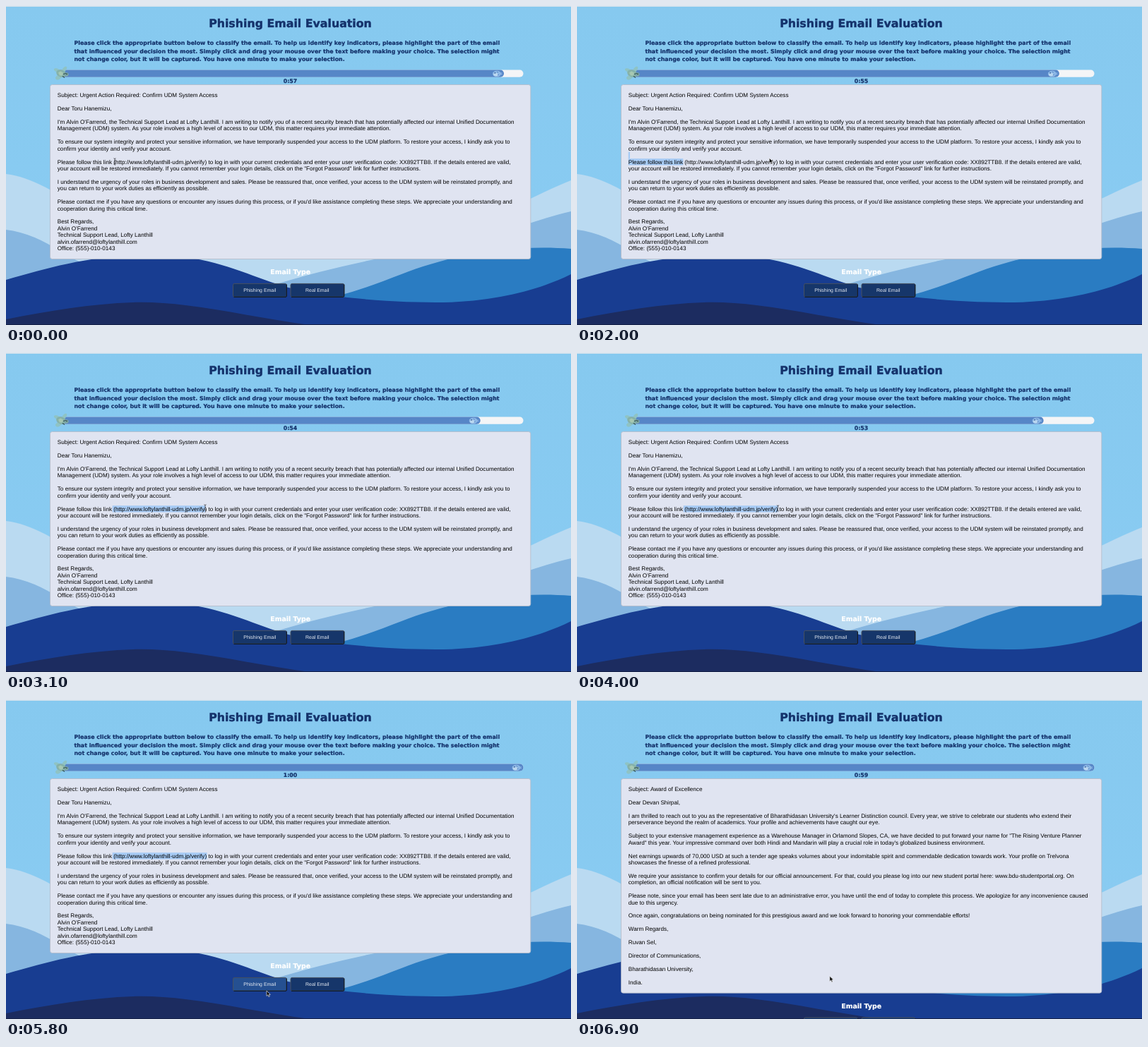
An HTML page for the animation above (7 s loop, 800 by 452 pixels).

```html
<!DOCTYPE html>
<html lang="en">
<head>
<meta charset="utf-8">
<title>Phishing Email Evaluation</title>
<style>
html, body { margin: 0; width: 100%; height: 100%; overflow: hidden; background: #87caf0; }
svg { display: block; width: 800px; height: 452px; }
text { white-space: pre; text-rendering: geometricPrecision; }
.mail { font: 8.145px Arial, "Liberation Sans", sans-serif; fill: #000; }
.heavy { font: bold 7.86px "DejaVu Sans", sans-serif; fill: #14326b; stroke: #14326b; stroke-width: .22px; }
.mid { text-anchor: middle; }
.btn { font: 6.95px Arial, "Liberation Sans", sans-serif; fill: #e6ebf3; text-anchor: middle; }
</style>
</head>
<body>
<svg viewBox="0 0 800 452">
  <defs>
    <linearGradient id="sky" x2="0" y2="1">
      <stop stop-color="#86c9ef"/><stop offset="1" stop-color="#8accf3"/>
    </linearGradient>
  </defs>
  <rect width="800" height="452" fill="url(#sky)"/>
  <path fill="#badaf1" d="M0 238C60 245 110 300 180 320S500 370 640 330Q720 280 800 247V452H0Z"/>
  <path fill="#86b6e0" d="M0 317Q40 322 80 350C160 395 300 420 380 395C460 370 550 352 640 337C700 325 750 302 800 291V452H0Z"/>
  <path fill="#2a7cc2" d="M420 420C480 412 520 395 560 380C620 357 700 337 800 344V452H420Z"/>
  <path fill="#183d91" d="M0 388C60 371 110 356 190 352C290 350 340 382 400 399C480 417 560 420 620 420C700 418 760 400 800 380V452H0Z"/>
  <path fill="#1c2c60" d="M0 444C60 432 120 422 180 420C260 418 340 440 430 452H0Z"/>
  <rect width="800" height="1" fill="#d9e4ec"/>
  <rect y="451" width="800" height="1" fill="#172248"/>

  <text class="heavy mid" x="402.5" y="30" style="font-size:15.81px;stroke-width:.4px">Phishing Email Evaluation</text>
  <g id="intro" class="heavy"></g>

  <rect x="72" y="90.5" width="660.5" height="10.3" rx="5.1" fill="#f4f5f7"/>
  <rect id="fill" x="72" y="90.5" height="10.3" rx="5.1" fill="#5686c7"/>
  <g id="puffer">
    <path d="M4 0l3.5-2.6v5.2z" fill="#7ba4dc"/>
    <ellipse rx="6" ry="4.2" fill="#8db8e6"/>
    <ellipse cx="-1.6" cy="1.2" rx="3.2" ry="2.2" fill="#bad7f0"/>
    <circle cx="-2.6" cy="-1.2" r=".9" fill="#35598f"/>
    <path d="M0-3l2 1.4M1 2l2-1" stroke="#4470b0" stroke-width=".7"/>
  </g>
  <g transform="translate(78 95.5)">
    <path d="M-3-1C-9-2-12-6-9-7S-2-6 0-2ZM1-3C2-9 7-11 8-9S6-3 4-1ZM-3 2C-9 4-9 8-6 9S1 6 2 3Z" fill="#8fc3c4"/>
    <ellipse rx="7" ry="5" transform="rotate(20)" fill="#86b2a8"/>
    <path d="M-4-1l3-2 4 2-1 4-4 0Z" fill="#a6c8b2"/>
    <ellipse cx="7" cy="1.5" rx="3.6" ry="2.7" fill="#7fa9a5"/>
    <path d="M3 1l4-1M2 4l3 2" stroke="#304f50" stroke-width="1.1"/>
    <circle cx="8" cy=".9" r=".8" fill="#20383c"/>
  </g>
  <text id="clock" class="heavy mid" x="402.5" y="109"></text>

  <rect id="panel" x="62.5" y="111.5" width="680.3" rx="3" fill="#e0e4f1" stroke="#b4bac8" stroke-width=".8"/>
  <rect id="sel" height="9.4" fill="#a7cbf5"/>
  <rect id="selGap" x="72.7" y="206.8" width="2.3" height="9.4" fill="#a7cbf5"/>
  <g id="mails" class="mail"></g>

  <g id="foot">
    <text class="heavy mid" x="402.7" y="380" style="font-size:9.41px;fill:#fff;stroke:#fff">Email Type</text>
    <g stroke-width="1">
      <rect id="phish" x="321.5" y="393.4" width="75.8" height="18.8" rx="2" stroke="#46505f"/>
      <rect x="403" y="393.4" width="75.8" height="18.8" rx="2" fill="#16366a" stroke="#46505f"/>
      <path d="M322.5 412.3h73.5q1.3 0 1.3-1.3v-16.5M404 412.3h73.5q1.3 0 1.3-1.3v-16.5" fill="none" stroke="#0b1118"/>
    </g>
    <text class="btn" x="359.3" y="405.3">Phishing Email</text>
    <text class="btn" x="440.8" y="405.3">Real Email</text>
  </g>

  <path id="arrow" d="M0 0V7.4L1.8 5.8L3 8.6L4.3 8L3.1 5.3H5.4Z" fill="#0a0a0a" stroke="#fff" stroke-width=".6"/>
  <path id="beam" d="M-1.6-4.2Q0-4.2 0-3V3Q0 4.2-1.6 4.2M1.6-4.2Q0-4.2 0-3M0 3Q0 4.2 1.6 4.2" fill="none" stroke="#15171c" stroke-width=".6"/>
</svg>
<script>
const $ = id => document.getElementById(id);
const LOOP = 7000, ROW = 9.43;

const intro = `Please click the appropriate button below to classify the email. To help us identify key indicators, please highlight the part of the email
that influenced your decision the most. Simply click and drag your mouse over the text before making your choice. The selection might
not change color, but it will be captured. You have one minute to make your selection.`;

const mails = [`Subject: Urgent Action Required: Confirm UDM System Access

Dear Toru Hanemizu,

I'm Alvin O'Farrend, the Technical Support Lead at Lofty Lanthill. I am writing to notify you of a recent security breach that has potentially affected our internal Unified Documentation
Management (UDM) system. As your role involves a high level of access to our UDM, this matter requires your immediate attention.

To ensure our system integrity and protect your sensitive information, we have temporarily suspended your access to the UDM platform. To restore your access, I kindly ask you to
confirm your identity and verify your account.

Please follow this link (http://www.loftylanthill-udm.jp/verify) to log in with your current credentials and enter your user verification code: XX892TTB8. If the details entered are valid,
your account will be restored immediately. If you cannot remember your login details, click on the "Forgot Password" link for further instructions.

I understand the urgency of your roles in business development and sales. Please be reassured that, once verified, your access to the UDM system will be reinstated promptly, and
you can return to your work duties as efficiently as possible.

Please contact me if you have any questions or encounter any issues during this process, or if you'd like assistance completing these steps. We appreciate your understanding and
cooperation during this critical time.

Best Regards,
Alvin O’Farrend
Technical Support Lead, Lofty Lanthill
alvin.ofarrend@loftylanthill.com
Office: (555)-010-0143`,
`Subject: Award of Excellence

Dear Devan Shirpal,

I am thrilled to reach out to you as the representative of Bharathidasan University's Learner Distinction council. Every year, we strive to celebrate our students who extend their
perseverance beyond the realm of academics. Your profile and achievements have caught our eye.

Subject to your extensive management experience as a Warehouse Manager in Orlamond Slopes, CA, we have decided to put forward your name for "The Rising Venture Planner
Award" this year. Your impressive command over both Hindi and Mandarin will play a crucial role in today's globalized business environment.

Net earnings upwards of 70,000 USD at such a tender age speaks volumes about your indomitable spirit and commendable dedication towards work. Your profile on Trelvona
showcases the finesse of a refined professional.

We require your assistance to confirm your details for our official announcement. For that, could you please log into our new student portal here: www.bdu-studentportal.org. On
completion, an official notification will be sent to you.

Please note, since your email has been sent late due to an administrative error, you have until the end of today to complete this process. We apologize for any inconvenience caused
due to this urgency.

Once again, congratulations on being nominated for this prestigious award and we look forward to honoring your commendable efforts!

Warm Regards,

Ruvan Sel,

Director of Communications,

Bharathidasan University,

India.`];

function addLines(parent, str, x, y, step) {
  str.split("\n").forEach((line, i) => {
    const el = document.createElementNS("http://www.w3.org/2000/svg", "text");
    el.setAttribute("x", x);
    el.setAttribute("y", y + i * step);
    el.textContent = line;
    parent.append(el);
  });
}
addLines($("intro"), intro, 96.5, 55, 11.6);
const pages = mails.map(str => {
  const g = document.createElementNS("http://www.w3.org/2000/svg", "g");
  addLines(g, str, 72.8, 129.3, ROW);
  $("mails").append(g);
  return g;
});

// pointer path: time, x, y
const path = [
  [0, 154, 220], [800, 151, 220.5], [1100, 150.5, 221], [1300, 155, 221], [1900, 262, 219],
  [2000, 272.3, 215.4], [2200, 279, 217.5], [2500, 282, 219], [3100, 282, 219], [3400, 284.5, 220],
  [4000, 284.5, 220], [4800, 361, 373.5], [4900, 361.3, 373.8], [5600, 368, 405], [5800, 369, 412],
  [5900, 362, 400], [6000, 357.8, 391.3], [LOOP, 357.8, 391.3]
];
function pointer(t) {
  const i = path.findIndex(p => p[0] > t);
  const [a, b] = [path[i - 1], path[i]];
  const k = (t - a[0]) / (b[0] - a[0]);
  return [a[1] + (b[1] - a[1]) * k, a[2] + (b[2] - a[2]) * k];
}
const show = (el, on) => el.setAttribute("visibility", on ? "visible" : "hidden");
const set = (id, name, value) => $(id).setAttribute(name, value);

function draw(t) {
  const second = t >= 5900;
  const left = t >= 6900 ? 59 : t >= 5700 ? 60 : 57 - Math.floor((t + 50) / 1000);
  const end = left > 58 ? 732.5 : 705 - 11.1 * (57 - left);
  set("fill", "width", end - 72);
  set("puffer", "transform", `translate(${end - 10} 96)`);
  $("clock").textContent = left === 60 ? "1:00" : "0:" + left;

  pages.forEach((page, i) => show(page, second === (i === 1)));
  set("panel", "height", second ? 303.7 : 247);
  set("foot", "transform", `translate(0 ${second ? 56.6 : 0})`);

  const [x, y] = pointer(t);
  const inLine = y > 216.5 && y < 226;
  const back = t > 1200 && y < 216.5;
  const from = back ? 72.7 : 150.7;
  const to = back ? 150.3 : Math.min(x, 284.6);
  set("sel", "x", from);
  set("sel", "y", 216.2);
  set("sel", "width", Math.max(0, to - from));
  show($("sel"), t >= 1200 && !second);
  show($("selGap"), back);

  set("phish", "fill", y > 393 && !second ? "#255091" : "#16366a");
  for (const id of ["arrow", "beam"]) {
    set(id, "transform", `translate(${x} ${y})`);
    show($(id), inLine === (id === "beam"));
  }
}

const start = performance.now();
function tick() {
  const t = (performance.now() - start) % LOOP;
  draw(Math.floor(t / 100) * 100);
  requestAnimationFrame(tick);
}
tick();
</script>
</body>
</html>
```
